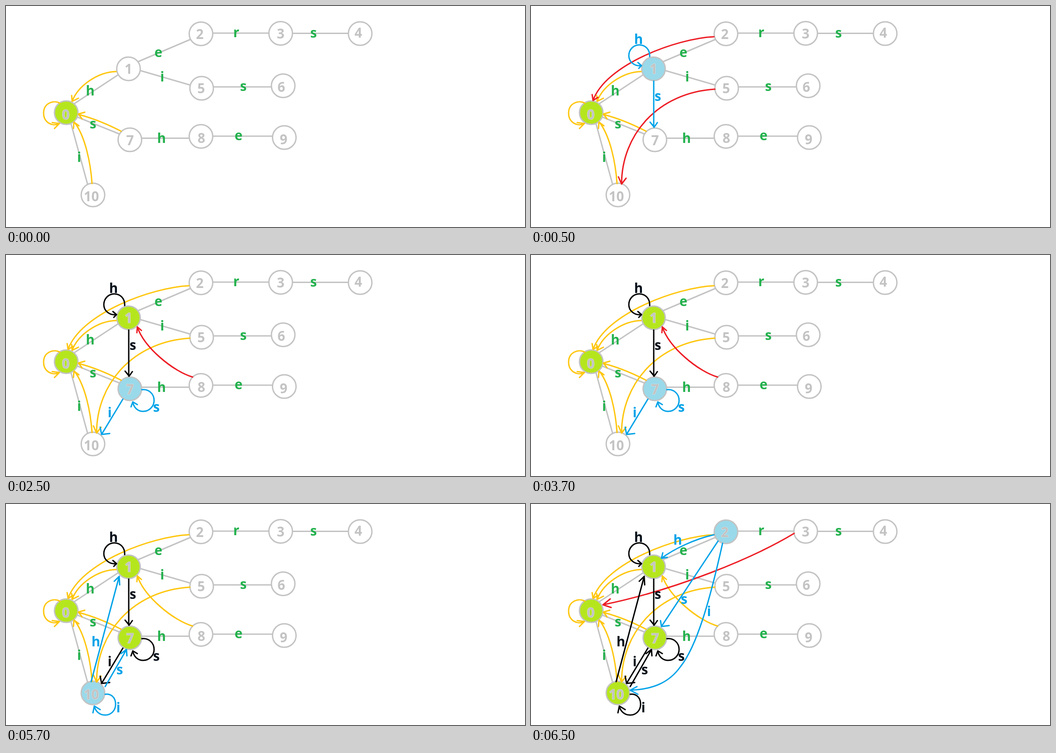
These frames come from a looping animation (1146x489 px, 8 s). An HTML page:

```html
<!DOCTYPE html>
<html lang="en">
<head>
<meta charset="utf-8">
<title>Automaton construction</title>
<style>
html, body { margin: 0; width: 100%; height: 100%; overflow: hidden; background: #fff; }
svg { display: block; width: 1146px; height: 489px; }
text { font: bold 29.5px "Open Sans", "Noto Sans", sans-serif; text-anchor: middle; }
path, circle { stroke-width: 3; }
path { fill: none; stroke-linecap: round; stroke-linejoin: round; }
</style>
</head>
<body>
<svg id="stage" viewBox="0 0 1146 489"></svg>
<script>
const GRAY = '#c3c3c3', GREEN = '#22b14c', YELLOW = '#ffc60e', RED = '#ed1c24',
  BLUE = '#00a2e8', BLACK = '#000', INK = '#030d18', DONE = '#b5e61d', ACTIVE = '#99d9ea';
const LOOP = 8000, STEPS = [500, 2500, 4500, 6500];
const stage = document.getElementById('stage');

function add(tag, attrs, content = '') {
  const el = document.createElementNS('http://www.w3.org/2000/svg', tag);
  for (const key in attrs) el.setAttribute(key, attrs[key]);
  el.textContent = content;
  return stage.appendChild(el);
}
const label = (content, x, y, fill) => add('text', { x, y, fill }, content);

// tree edges: path, letter, letter position
[
  ['M151 216L248 152', 'h', 186, 198],
  ['M292 123L407 74', 'e', 336.5, 113],
  ['M457 60H580', 'r', 508.5, 69],
  ['M633 60.5H756', 's', 679, 70],
  ['M297 143L407 175', 'i', 345, 167],
  ['M459 179H586', 's', 524, 188],
  ['M158 246L250 283', 's', 192, 271],
  ['M300 292.5H404', 'h', 343.5, 303],
  ['M457 288H588', 'e', 513.5, 297],
  ['M144 262L180 394', 'i', 161.5, 345]
].forEach(([d, letter, x, y]) => {
  add('path', { d, stroke: GRAY });
  label(letter, x, y, GREEN);
});

// nodes: centre, label position, step at which the node becomes active
const nodes = [
  [133, 236, 132, 251, -1],
  [270.5, 139, 270.5, 150, 1],
  [430.5, 61.5, 428, 73, 4],
  [606.5, 60.5, 606.5, 72],
  [782, 61, 778, 70],
  [432, 182, 431, 193],
  [612, 176.5, 608, 190],
  [273.5, 296, 274, 308, 2],
  [430.5, 288.5, 431.5, 303],
  [614.5, 291, 613, 306],
  [192, 418, 188.5, 432, 3]
].map(([cx, cy, x, y, start = 9], i) => {
  const disc = add('circle', { cx, cy, r: 26, stroke: GRAY });
  const digit = label(i, x, y, GRAY);
  digit.setAttribute('paint-order', 'stroke');
  digit.setAttribute('stroke', '#e4e4e4');
  return { disc, digit, start };
});

// links: first step, colour while new, colour afterwards, path with arrow head
const links = [];
function link(start, fresh, settled, d, letter, x, y) {
  links.push({
    start, fresh, settled,
    line: add('path', { d }),
    text: letter && label(letter, x, y)
  });
}
const fail = (start, d) => link(start, RED, YELLOW, d);
const go = (start, d, letter, x, y) => link(start, BLUE, BLACK, d, letter, x, y);

fail(-1, 'M119 215C105 207 83 215 83 237C83 258 103 268 117 260M102 258L118 260L107 271');
fail(-1, 'M243 145C205 146 160 174 146 211M145 198L146 211L160 204');
fail(-1, 'M254 277C225 262 195 249 160 240M174 235L160 239L168 250');
fail(-1, 'M190 393C187 350 176 290 151 257M149 271L150 257L161 265');
fail(1, 'M404 68C320 72 165 130 137 209M135 196L137 209L148 202');
fail(1, 'M406 184C280 192 200 285 200 394M193 378L200 394L210 381');
fail(2, 'M412 270C370 258 305 205 290 159M289 172L290 159L299 167');
fail(4, 'M581 65C490 120 320 190 159 223M175 210L159 223L177 229');

go(1, 'M262 112C263 96 252 86 239 86C226 86 216 97 216 110C216 123 228 134 244 132M236 125L244 132L238 138', 'h', 237.5, 84);
go(1, 'M271 166V268M263 257L272 268L279 258', 's', 280, 210);
go(2, 'M300 298C316 296 327 308 327 322C327 335 316 346 303 346C291 346 282 338 280 325M276 336L280 325L290 331', 's', 332, 347);
go(2, 'M258 319L211 397M208 381L211 397L229 395', 'i', 229, 359);
go(3, 'M188 393L250 160M239 171L250 160L251 179', 'h', 198.5, 315);
go(3, 'M219 404L266 322M254 331L266 322L267 336', 's', 251, 377);
go(3, 'M219 421C233 419 242 429 242 443C242 457 232 467 219 467C206 467 197 458 195 447M192 462L195 447L208 455', 'i', 248, 461);
go(4, 'M404 68C360 78 315 100 288 120M291 108L288 120L301 118', 'h', 324, 90);
go(4, 'M413 82L288 271M286 258L288 271L305 269', 's', 338, 221);
go(4, 'M423 87C400 190 370 310 330 360C305 395 270 410 219 412M234 404L219 412L236 421', 'i', 393, 248);

function render(time) {
  const step = STEPS.filter(t => t <= time).length;
  for (const { disc, digit, start } of nodes) {
    disc.setAttribute('fill', step < start ? '#fff' : step === start ? ACTIVE : DONE);
    digit.setAttribute('stroke-width', step < start ? 0 : 1.2);
  }
  for (const { start, fresh, settled, line, text } of links) {
    const color = step < start ? 'none' : step === start ? fresh : settled;
    line.setAttribute('stroke', color);
    if (text) text.setAttribute('fill', color === BLACK ? INK : color);
  }
}

const origin = performance.now();
function tick() {
  render((performance.now() - origin) % LOOP);
  requestAnimationFrame(tick);
}
tick();
</script>
</body>
</html>
```
